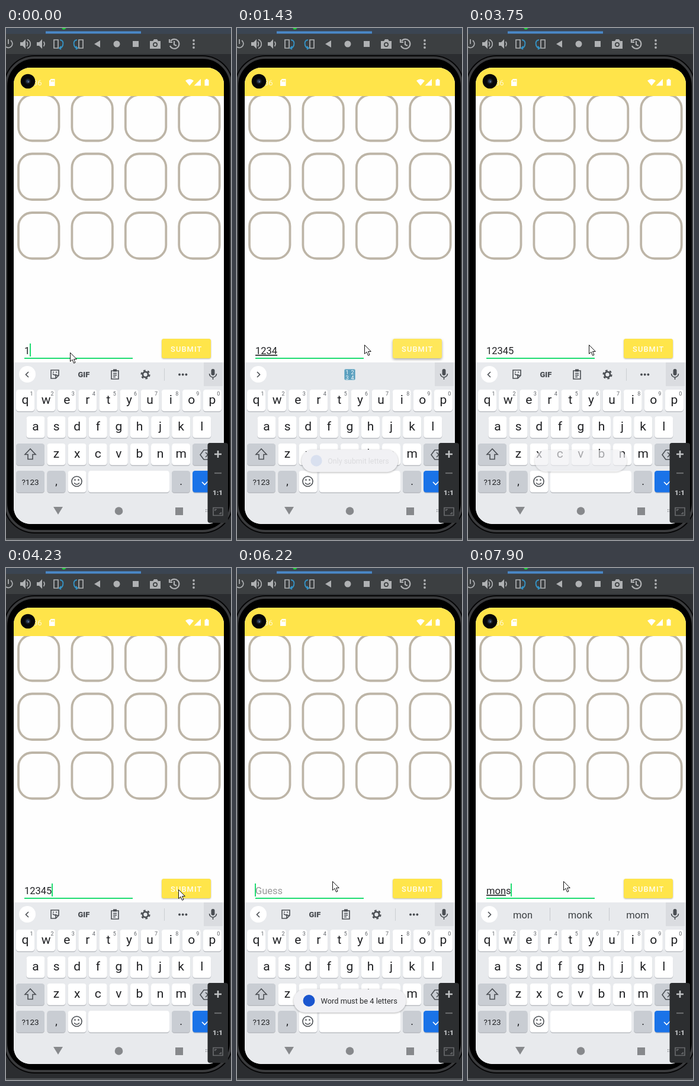
Recreate the animation shown at these times as an HTML page. Size 380x865 px, loop 8 s.

```html
<!DOCTYPE html>
<html lang="en">
<head>
<meta charset="utf-8">
<title>Word guess</title>
<style>
html, body { margin: 0; width: 100%; height: 100%; overflow: hidden; background: #2b2d30; }
svg { display: block; }
text { font-family: Roboto, sans-serif; white-space: pre; }
.mid { text-anchor: middle; }
.line { fill: none; stroke: #afb1b3; stroke-width: 1.7; }
.bold { stroke-width: 2.2; }
.blue { stroke: #3592c4; stroke-width: 2; }
.ink { fill: none; stroke: #4a4e53; stroke-width: 1.6; }
.sug { font-size: 16.5px; fill: #3c4043; text-anchor: middle; }
#typed { font-size: 16.5px; fill: #202124; }
#under { text-decoration: underline; text-decoration-thickness: 1px; }
#btn { filter: drop-shadow(0 1px 1px rgba(0,0,0,.3)); }
#btn.down { filter: drop-shadow(0 2px 2px rgba(0,0,0,.35)); }
#pill { filter: drop-shadow(0 1px 1.5px rgba(0,0,0,.3)); }
</style>
</head>
<body>
<svg width="380" height="865" viewBox="0 0 380 865">
<defs>
  <clipPath id="screen"><rect x="13" y="67" width="355" height="771" rx="28"/></clipPath>
  <clipPath id="page"><rect x="13" y="115" width="355" height="450"/></clipPath>
</defs>

<!-- window chrome -->
<rect width="380" height="865" fill="#2b2d30"/>
<rect width="380" height="10" fill="#3b4552"/>
<rect x="67" y="5.500" width="161" height="4" fill="#4a88c7"/>
<path d="M94 0h8l-3 2.500h-3z" fill="#21d13c"/>
<rect y="10" width="380" height="34" fill="#3c3f41"/>
<rect y="862" width="380" height="3" fill="#4a4d50"/>
<g fill="#afb1b3">
  <path class="line" d="M4 19v8M8 21a6.500 6.500 0 0 1-8 11"/>
  <path d="M24 24h4l5-5v16l-5-5h-4zM52 24h4l5-5v16l-5-5h-4z"/>
  <path class="line" d="M35 23q3 4 0 8M36 19.500a8 8 0 0 1 0 15M63.500 23q3 4 0 8"/>
  <path class="line" d="M81 20h7v14h-7zM123 20h7v14h-7z"/>
  <path class="line blue" d="M91 20q7 1 5 9q-1 4-5 5M93 31l-3 3l3 2M120 20q-7 1-5 9q1 4 5 5M118 31l3 3l-3 2"/>
  <path d="M149 27l10-6v12z"/>
  <circle cx="187" cy="27" r="5.500"/>
  <rect x="214" y="22" width="10" height="10"/>
  <path d="M243 22h5l2-3h5l2 3h4v13h-18z"/>
  <circle cx="252" cy="28" r="4" fill="#3c3f41"/><circle cx="252" cy="28" r="2.300"/>
  <path class="line bold" d="M278 22a8 8 0 1 1-1 8M276 19v5h5M284 22v6l4 2"/>
  <circle cx="317" cy="21" r="1.900"/><circle cx="317" cy="27" r="1.900"/><circle cx="317" cy="33" r="1.900"/>
</g>

<!-- phone body -->
<rect x="-4" y="46" width="388" height="808" rx="52" fill="#060607"/>
<rect x="0" y="50" width="380" height="800" rx="48" fill="#000" stroke="#3a3b3d" stroke-width="4"/>

<g clip-path="url(#screen)">
  <rect x="13" y="67" width="355" height="771" fill="#fefefe"/>
  <rect x="13" y="67" width="355" height="48" fill="#ffe44a"/>
  <g fill="#fff">
    <text x="46" y="97" font-size="13" opacity=".75">36</text>
    <path d="M76 86h6.500v12h-9.500v-9z"/>
    <path d="M303 89q7-5.500 14 0l-7 8.500zM329 86v11.500h-11.500zM335.500 87.500h2v-1.500h3v1.500h2v10h-7z"/>
  </g>
  <path d="M76.500 88v3M78.500 88v3M80.500 88v3" stroke="#ffe44a"/>
  <circle cx="37" cy="90" r="12.300" fill="#050608"/>
  <circle cx="37" cy="90" r="5" fill="#15181d"/><circle cx="37" cy="90" r="2.800" fill="#30425f"/><circle cx="38" cy="91" r="1" fill="#7c8ba3"/>
  <g id="tiles" clip-path="url(#page)" fill="none" stroke="#bdb5a7" stroke-width="3.800"/>

  <!-- entry row -->
  <text id="hint" x="31" y="551" font-size="16.500" fill="#999">Guess</text>
  <text id="typed" x="31" y="551"><tspan id="under"></tspan><tspan id="rest"></tspan></text>
  <rect x="31" y="557" width="183" height="2" fill="#1fdc72"/>
  <rect id="caret" y="533" width="2" height="22" fill="#1fdc72"/>
  <g id="btn">
    <rect x="263" y="525" width="83" height="33" rx="3.500" fill="#ffe54a"/>
    <rect id="ripple" x="263" y="525" width="83" height="33" rx="3.500" fill="#fff"/>
    <text x="278" y="547" font-size="12.800" font-weight="500" letter-spacing="1.150" fill="#fffdf0">SUBMIT</text>
  </g>

  <!-- keyboard -->
  <rect x="13" y="565" width="355" height="273" fill="#e8eaed"/>
  <rect x="334" y="565" width="32" height="40" fill="#dadce0"/>
  <rect x="346.500" y="576" width="6" height="11" rx="3" fill="#4a4e53"/>
  <path class="ink" d="M343.500 584a6 6 0 0 0 12 0M349.500 590v4"/>
  <circle cx="36" cy="585" r="14" fill="#fff"/>
  <path id="chev" class="ink"/>
  <g id="tools">
    <path class="ink" d="M76 578h13v9l-5 5h-8zM89 587h-5v5M79 584q3 4 6 1M79 581.500h2M84 581.500h2"/>
    <text x="121.500" y="589.500" font-size="13" font-weight="900" fill="#4a4e53">GIF</text>
    <path class="ink" d="M178 579h12v14h-12zM181 583.500h6M181 586.500h6M181 589.500h4"/>
    <rect x="181" y="576.500" width="6" height="4" fill="#4a4e53"/>
    <circle cx="235.500" cy="585.500" r="7" fill="none" stroke="#4a4e53" stroke-width="2.200" stroke-dasharray="3.665"/>
    <circle cx="235.500" cy="585.500" r="4.600" fill="none" stroke="#4a4e53" stroke-width="2.800"/>
    <path d="M267.500 575v21" stroke="#cbced2"/>
    <g fill="#4a4e53"><circle cx="293" cy="585.500" r="1.900"/><circle cx="298.700" cy="585.500" r="1.900"/><circle cx="304.400" cy="585.500" r="1.900"/></g>
  </g>
  <g id="digits">
    <rect x="181.500" y="576.500" width="18" height="18" rx="2" fill="#5b9fbe" stroke="#8fbfd3"/>
    <g class="mid" font-size="9" fill="#fff">
      <text x="186" y="584.500">1</text><text x="195" y="584.500">2</text>
      <text x="186" y="593.500">3</text><text x="195" y="593.500">4</text>
    </g>
  </g>
  <g id="words">
    <text class="sug" x="92.500" y="591.500">mon</text>
    <text class="sug" x="189.500" y="591.500">monk</text>
    <text class="sug" x="286.500" y="591.500">mom</text>
    <path d="M138.500 574v22M238.500 574v22" stroke="#c6c9cd"/>
  </g>
  <g id="keys"></g>
  <path class="ink" d="M41 711l-9 9.500h5v8h8v-8h5z"/>
  <path class="ink" d="M328 721l6-8h18v16h-18zM337 717l8 8M345 717l-8 8"/>
  <circle class="ink" cx="119.500" cy="766" r="8.500"/>
  <circle cx="116.500" cy="763.500" r="1.300" fill="#4a4e53"/><circle cx="122.500" cy="763.500" r="1.300" fill="#4a4e53"/>
  <path class="ink" d="M115 768.500q4.500 5 9 0"/>
  <path class="ink" style="stroke:#fff" d="M331 767l4.500 4.500l8-8"/>

  <g fill="#87898c">
    <path d="M80 809h16l-8 13z"/><circle cx="190.500" cy="816" r="6.800"/><rect x="286" y="810" width="13" height="13"/>
    <path d="M337 813h1.500v1.500h-1.500zM340 813h1.500v1.500h-1.500zM337 816h1.500v1.500h-1.500zM340 816h1.500v1.500h-1.500z"/>
  </g>

  <g id="toast">
    <rect id="pill" y="711.500" height="39.500" rx="19.700" fill="#f1f1f4"/>
    <g id="note">
      <circle id="badge" cy="731" r="10" fill="#1a56cf"/>
      <text id="msg" y="736" font-size="12.850" fill="#2b2c2e"></text>
    </g>
  </g>
</g>

<!-- zoom panel -->
<rect x="340.500" y="701" width="34.500" height="135" rx="4" fill="#2c2e30"/>
<path d="M352 720h12M358 714v12" stroke="#c0c2c4" stroke-width="2.600"/>
<path d="M352 752h12" stroke="#67696b" stroke-width="2.200"/>
<text class="mid" x="357.500" y="789" font-size="11.500" font-weight="900" fill="#c0c2c4">1:1</text>
<path d="M350 810.500h16v13h-16zM353 816v-2.500h3M363 818v2.500h-3" fill="none" stroke="#67696b" stroke-width="1.700"/>

<path id="mouse" d="M.500 .500V15.500L4 12.300L6.500 18.300L9 17.200L6.500 11.500H11.300Z" fill="#fff" stroke="#111" stroke-linejoin="round"/>
</svg>

<script>
const $ = id => document.getElementById(id);
const LOOP = 8000;

// ---- static parts ----
let tiles = '';
for (let r = 0; r < 3; r++)
  for (let c = 0; c < 4; c++)
    tiles += `<rect x="${21 + c * 90.4}" y="${113 + r * 99.5}" width="68.500" height="77.500" rx="23"/>`;
$('tiles').innerHTML = tiles;

let keys = '';
function key(x, y, w, label = '', fill = '#fff', size = 21) {
  keys += `<rect x="${x}" y="${y + 1}" width="${w}" height="37" rx="4.500" fill="#b9bcc1"/>
    <rect x="${x}" y="${y}" width="${w}" height="36.500" rx="4.500" fill="${fill}"/>
    <text class="mid" x="${x + w / 2}" y="${y + 24}" font-size="${size}" fill="#1f2023">${label}</text>`;
}
const GREY = '#c9cdd3';
[...'qwertyuiop'].forEach((ch, i) => {
  const x = 17 + i * 35.1;
  key(x, 611, 31, ch);
  keys += `<text class="mid" x="${x + 26}" y="621" font-size="9" fill="#5f6368">${(i + 1) % 10}</text>`;
});
[...'asdfghjkl'].forEach((ch, i) => key(34.5 + i * 35.1, 656, 31, ch));
[...'zxcvbnm'].forEach((ch, i) => key(69.5 + i * 35.1, 702, 31, ch));
key(17, 702, 48, '', GREY);
key(315, 702, 48, '', GREY);
key(17, 748, 48, '?123', GREY, 13.5);
key(69.5, 748, 31, ',', GREY, 18);
key(104.5, 748, 31);
key(139, 748, 137);
key(280, 748, 31, '.', GREY, 18);
key(315, 748, 48, '', '#1a73e8');
$('keys').innerHTML = keys;

// ---- timeline ----
// screen refreshes happen only at these moments
const ticks = [0, 310, 430, 740, 890, 1010, 1130, 1280, 1430, 1580, 1730, 1880, 2460,
  2890, 3140, 3290, 3600, 3750, 3850, 3980, 4110, 4230, 4380, 4530, 4650, 4800, 4950, 5070,
  5630, 6220, 6650, 6800, 6950, 7200, 7510, 7630, 7750, 7900];

// time, text, underlined letters, suggestion strip
const entry = [
  [0, '1', 0, 'tools'], [310, '12', 0, 'tools'], [430, '123', 0, 'tools'],
  [740, '1234', 0, 'tools'], [890, '1234', 4, 'digits'], [2890, '12345', 4, 'digits'],
  [3140, '12345', 0, 'tools'], [5630, '1234', 4, 'digits'], [6220, '', 0, 'tools'],
  [7510, 'm', 0, 'tools'], [7630, 'mo', 0, 'tools'], [7750, 'mon', 3, 'words'],
  [7900, 'mons', 3, 'words']
];
const blinks = [1280, 1880, 2460, 2890, 3600, 4110, 4650, 5070, 6650, 7200];
const path = [[740, 108, 548], [1130, 292, 543], [1280, 292, 543], [1430, 215, 535],
  [1580, 204, 535], [3750, 204, 535], [4110, 291, 543], [4230, 291, 543], [4530, 161, 529]];
const toasts = [
  { text: 'Only submit letters', from: 1280, to: 3550, x: 106, w: 169 },
  { text: 'Word must be 4 letters', from: 4380, to: 6600, x: 95.5, w: 190 }
];
const presses = [[1280, 1880], [4380, 4800]];

const clamp = v => Math.max(0, Math.min(1, v));
const last = (list, t) => list.filter(e => e[0] <= t).pop();

function mouseAt(t) {
  const a = last(path, t) || path[0];
  const b = path.find(p => p[0] > t) || a;
  const k = a === b ? 0 : clamp((t - a[0]) / (b[0] - a[0]));
  return [1, 2].map(i => Math.round(a[i] + (b[i] - a[i]) * k));
}

function drawToast(t) {
  const n = toasts.find(n => t > n.from && t < n.to + 400);
  $('toast').style.display = n ? '' : 'none';
  if (!n) return;
  const p = clamp((t - n.from) / 300), q = clamp((t - n.to) / 400);
  const s = (0.93 + 0.07 * p) * (1 - 0.16 * q);
  $('toast').setAttribute('transform', `translate(190.5 731) scale(${s}) translate(-190.5 -731)`);
  $('pill').setAttribute('x', n.x);
  $('pill').setAttribute('width', n.w);
  $('pill').style.opacity = clamp(2 * p) * clamp(1.3 * (1 - q));
  $('note').style.opacity = clamp((p - 0.44) / 0.56) * clamp(1 - 2 * q);
  $('badge').setAttribute('cx', n.x + 26);
  $('msg').setAttribute('x', n.x + 46);
  $('msg').textContent = n.text;
}

function drawEntry(t) {
  const [, text, marked, strip] = last(entry, t);
  $('under').textContent = text.slice(0, marked);
  $('rest').textContent = text.slice(marked);
  $('hint').style.display = text ? 'none' : '';
  for (const id of ['tools', 'digits', 'words']) $(id).style.display = id === strip ? '' : 'none';
  $('chev').setAttribute('d', strip === 'tools' ? 'M38 581l-4.500 4.500l4.500 4.500' : 'M34 581l4.500 4.500l-4.500 4.500');
  const w = text ? $('typed').getComputedTextLength() : 0;
  $('caret').setAttribute('x', Math.round(30.3 + w));
  $('caret').style.display = blinks.filter(b => b <= t).length % 2 ? 'none' : '';
}

function draw(t) {
  drawEntry(t);
  drawToast(t);
  const press = presses.find(([a, b]) => t >= a && t < b);
  $('btn').classList.toggle('down', !!press);
  $('ripple').style.opacity = press ? 0.12 * (1 - (t - press[0]) / (press[1] - press[0])) : 0;
  $('mouse').setAttribute('transform', `translate(${mouseAt(t)})`);
}

let start, shown;
function frame(now) {
  start ??= now;
  const t = (now - start) % LOOP;
  const tick = ticks.filter(k => k <= t).pop() ?? 0;
  if (tick !== shown) draw(shown = tick);
  requestAnimationFrame(frame);
}
draw(0);
requestAnimationFrame(frame);
</script>
</body>
</html>
```
